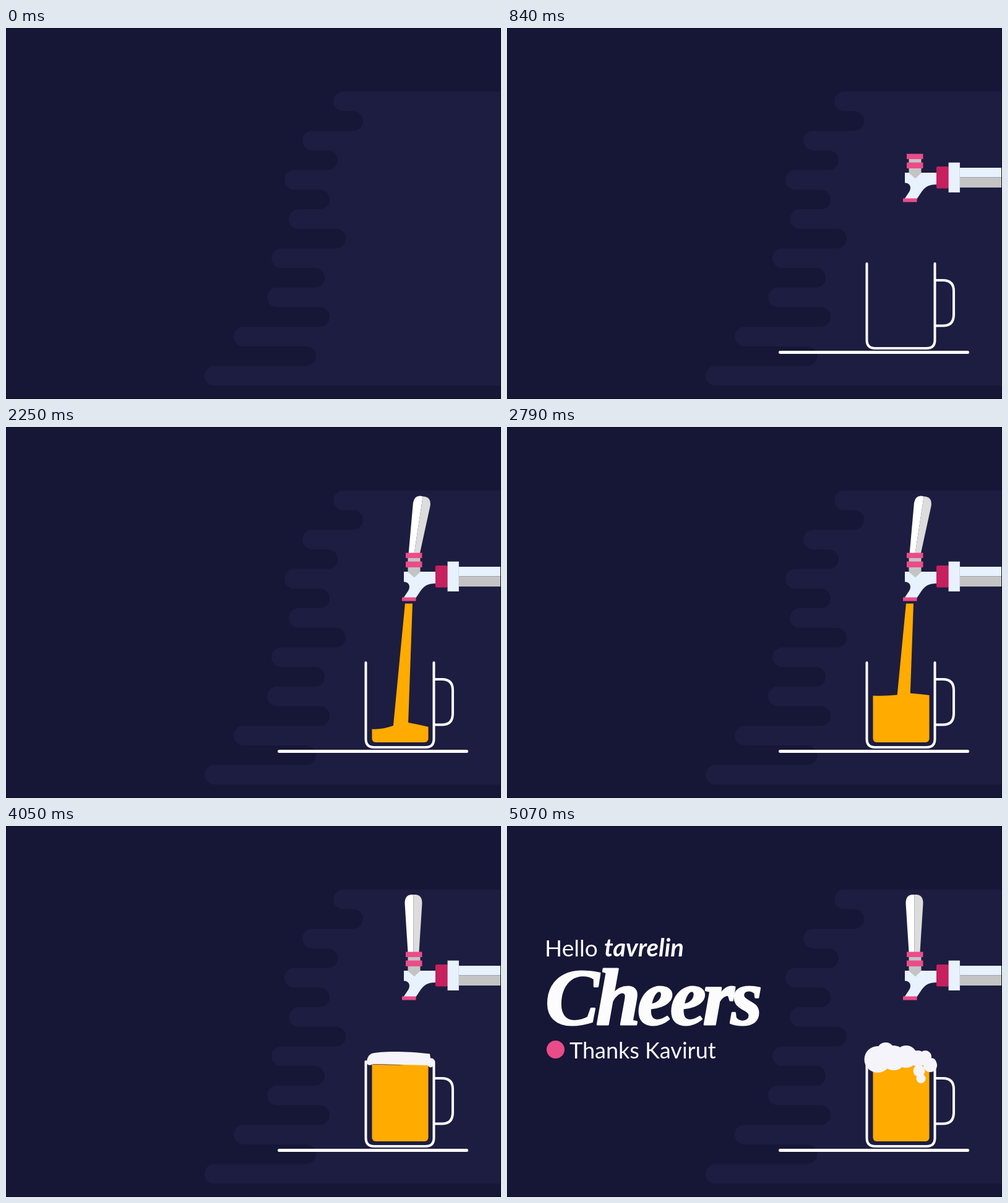
Recreate the animation shown at these times as an HTML page with a canvas. Size 800x600 px, loop 6.18 s.

```html
<!DOCTYPE html>
<html lang="en">
<head>
<meta charset="utf-8">
<title>Cheers</title>
<style>
html, body { margin: 0; width: 100%; height: 100%; overflow: hidden; background: #161637; }
canvas { display: block; }
</style>
</head>
<body>
<canvas id="stage" width="800" height="600"></canvas>
<script>
const ctx = document.getElementById('stage').getContext('2d');
const LOOP = 6180, STEP = 30, TAU = Math.PI * 2;
const BG = '#161637', PANEL = '#1d1d41', ICE = '#e8f2ff', GREY = '#c4c4c4';
const PINK = '#ea4c89', RED = '#c6205f', BEER = '#ffab00', FOAM = '#f5f4fb';

const prog = (t, a, b) => Math.min(1, Math.max(0, (t - a) / (b - a)));
const mix = (a, b, k) => a + (b - a) * k;
const easeOut = k => 1 - (1 - k) ** 3;
const easeInOut = k => k * k * (3 - 2 * k);
const backOut = (k, c = 2.2) => 1 + (c + 1) * (k - 1) ** 3 + c * (k - 1) ** 2;

function box(color, x, y, w, h) {
  ctx.fillStyle = color;
  ctx.fillRect(x, y, w, h);
}
function fill(color, path) {
  ctx.fillStyle = color;
  ctx.fill(new Path2D(path));
}
function disc(color, x, y, r) {
  ctx.fillStyle = color;
  ctx.beginPath();
  ctx.arc(x, y, r, 0, TAU);
  ctx.fill();
}
function group(draw) {
  ctx.save();
  draw();
  ctx.restore();
}
function clipBox(x, y, w, h) {
  ctx.beginPath();
  ctx.rect(x, y, w, h);
  ctx.clip();
}

const ends = [529, 577, 479, 536, 450, 523, 457, 549, 429, 515, 422, 523, 368, 501, 321];

function backdrop() {
  box(BG, 0, 0, 800, 600);
  const top = 102.8, h = 31.7, r = h / 2;
  ctx.fillStyle = PANEL;
  ctx.beginPath();
  ctx.moveTo(800, top);
  ends.forEach((x, i) => {
    const out = i % 2 === 0;
    ctx.arc(out ? x + r : x - r, top + i * h + r, r, -Math.PI / 2, Math.PI / 2, out);
  });
  ctx.lineTo(800, top + ends.length * h);
  ctx.fill();
}

function table(t) {
  const half = 151.5 * Math.max(0, backOut(prog(t, 0, 390)));
  if (t < STEP) return;
  ctx.lineWidth = 5;
  ctx.beginPath();
  ctx.moveTo(593 - half, 524.5);
  ctx.lineTo(593 + half, 524.5);
  ctx.stroke();
}

const mugPath = new Path2D('M-55 -68.5V55Q-55 68.5 -41.5 68.5H41.5Q55 68.5 55 55V-68.5' +
  'M55 -41.5H68Q85.5 -41.5 85.5 -24V14Q85.5 32 68 32H55');

// The mug hops up from the table, then rocks to rest.
function mug(t) {
  if (t <= 210) return;
  const air = prog(t, 210, 585), rock = prog(t, 585, 840);
  const deg = t < 585 ? mix(-12, 7.2, air) : 7.2 * Math.cos(rock * Math.PI * 1.5) * (1 - rock);
  const a = deg * Math.PI / 180;
  const size = easeOut(prog(t, 210, 360));
  const dy = Math.min(-640 * air * (1 - air), -55 * Math.abs(Math.sin(a)));
  group(() => {
    ctx.translate(636.5, 449.5 + dy);
    ctx.rotate(a);
    ctx.scale(size, size);
    ctx.lineWidth = 4;
    ctx.stroke(mugPath);
  });
}

function pipe(t) {
  const x = mix(800, 731, easeOut(prog(t, 210, 510)));
  box(ICE, x, 226, 70, 15.5);
  box(GREY, x, 241.5, 70, 16.5);
}

function lever(t) {
  const rise = easeOut(prog(t, 990, 1260));
  if (!rise) return;
  const tilt = 8.7 * (easeOut(prog(t, 1260, 1530)) * 0.2 + prog(t, 1260, 1530) * 0.8) *
    (1 - easeInOut(prog(t, 2940, 3270)));
  group(() => {
    clipBox(600, 90, 120, 118);
    ctx.translate(658.5, 212 + 100 * (1 - rise));
    ctx.rotate(tilt * Math.PI / 180);
    fill('#fff', 'M0 -101H-4Q-14 -100 -14 -87L-8.5 0H0Z');
    fill('#dcdcdc', 'M0 -101H4Q14 -100 14 -87L8.5 0H0Z');
  });
}

function tap(t) {
  const out = easeOut(prog(t, 630, 840));
  if (!out) return;
  group(() => {
    clipBox(560, 200, 173, 100);
    ctx.translate(94 * (1 - out), 0);
    fill(ICE, 'M643 234H695V253C681 253 676 257 670 265L662 277H642L650 265C655 257 650 250 643 250.5Z');
    fill(GREY, 'M649.5 211H669.5V234.5L660 243.5L649.5 234.5Z');
    box(PINK, 646, 203.5, 26.5, 8.5);
    box(PINK, 646, 217.5, 26.5, 9.5);
    box(PINK, 640, 275.5, 22.5, 6);
    ctx.fillStyle = RED;
    ctx.beginPath();
    ctx.roundRect(694, 224, 20, 35.5, 2);
    ctx.fill();
    box(GREY, 713.5, 217.5, 18.5, 48.5);
    box(ICE, 714, 218, 17.5, 47.5);
  });
}

function stream(t, level) {
  const head = mix(285.5, 500, prog(t, 1650, 1980) ** 1.6);
  const tail = mix(285.5, level, prog(t, 3300, 3510) ** 1.4);
  const low = Math.min(head, level + 8);
  if (t < 1650 || tail >= level) return;
  group(() => {
    clipBox(600, tail, 90, Math.max(0, low - tail));
    fill(BEER, 'M645 285L657 285L649 508L623.5 508Z');
  });
}

function beer(t) {
  const level = t < 2250 ? mix(510, 485, prog(t, 1980, 2250)) : mix(485, 385.5, prog(t, 2250, 3300));
  stream(t, level);
  if (t <= 1980) return;
  const fade = 1 - prog(t, 2250, 3300), run = prog(t, 2250, 3300);
  const wave = 4 * Math.sin(run * TAU * 3) * Math.sin(run * Math.PI);
  const drop = prog(t, 1980, 2250);
  const at = d => level + d * fade * drop;
  const lx = 645 - (level - 285) * 0.0964, rx = 657 - (level - 285) * 0.036;
  group(() => {
    ctx.beginPath();
    ctx.roundRect(591.5, 300, 91, 210, 6);
    ctx.clip();
    ctx.fillStyle = BEER;
    ctx.beginPath();
    ctx.moveTo(591, at(3.5) + wave);
    ctx.quadraticCurveTo(mix(591, lx, 0.5), at(3.5) + wave + 1, lx, at(-3) + 1);
    ctx.lineTo(rx, at(-7));
    ctx.quadraticCurveTo(mix(rx, 683, 0.5), at(-4), 683, at(0) - wave - 2 * run * (1 - prog(t, 3300, 3510)));
    ctx.lineTo(683, 512);
    ctx.lineTo(591, 512);
    ctx.fill();
  });
}

const bubbles = [
  [599, 377.5, 21.5], [612, 364, 14], [625, 375, 20], [645, 373, 18], [664, 376, 13],
  [676, 373, 10], [684, 387, 11], [666, 396, 9.5], [669, 408.5, 7.5]
];

function foam(t) {
  const rise = easeOut(prog(t, 3510, 4050));
  if (!rise) return;
  // One stray bubble floats off the top.
  if (t >= 4620 && t < 4800) {
    const k = prog(t, 4590, 4800);
    ctx.globalAlpha = 1 - prog(t, 4710, 4800);
    disc(FOAM, 616.5, mix(350, 335, easeOut(k)), 6.5);
    ctx.globalAlpha = 1;
  }
  group(() => {
    ctx.translate(0, 386);
    ctx.scale(1, rise);
    ctx.translate(0, -386);
    fill(FOAM, 'M583 383C583 376 586 370 591 368C606 364 646 364 685 368.5L686 375.5' +
      'C690 375 693 378 693 381C690 384 692 388 688 390C684 392 683 387 680 387L593 385' +
      'C590 387 584 388 583 383Z');
  });
  bubbles.forEach(([x, y, r], i) => {
    const k = prog(t, 4140 + i * 12, 4320 + i * 15);
    if (k) disc(FOAM, x, y, r * easeOut(k));
  });
}

function label(text, font, x, y, gap = 0) {
  ctx.font = font;
  ctx.letterSpacing = gap + 'px';
  ctx.fillText(text, x, y);
}

function greeting(t) {
  const alpha = prog(t, 4980, 5070);
  if (!alpha) return;
  group(() => {
    ctx.globalAlpha = alpha;
    ctx.fillStyle = '#fcfcfc';
    label('Hello', '400 37px Lato, sans-serif', 61, 211);
    label('tavrelin', 'italic 700 40px Lato, sans-serif', 157, 211);
    label('Cheers', 'italic 700 130px "Liberation Serif", serif', 62, 321, -5);
    ctx.strokeStyle = '#fcfcfc';
    ctx.lineWidth = 3;
    ctx.strokeText('Cheers', 62, 321);
    label('Thanks Kavirut', '400 36px Lato, sans-serif', 101, 376);
    disc(PINK, 78.5, 361.5, 14.5);
  });
}

function draw(t) {
  ctx.strokeStyle = '#fff';
  ctx.lineCap = 'round';
  ctx.lineJoin = 'round';
  backdrop();
  table(t);
  pipe(t);
  lever(t);
  tap(t);
  beer(t);
  mug(t);
  foam(t);
  greeting(t);
  ctx.strokeStyle = '#0c0c20';
  ctx.lineWidth = 1;
  ctx.strokeRect(0.5, 0.5, 799, 599);
}

const start = performance.now();
function tick() {
  const t = (performance.now() - start) % LOOP;
  draw(Math.floor(t / STEP) * STEP);
  requestAnimationFrame(tick);
}
tick();
</script>
</body>
</html>
```
